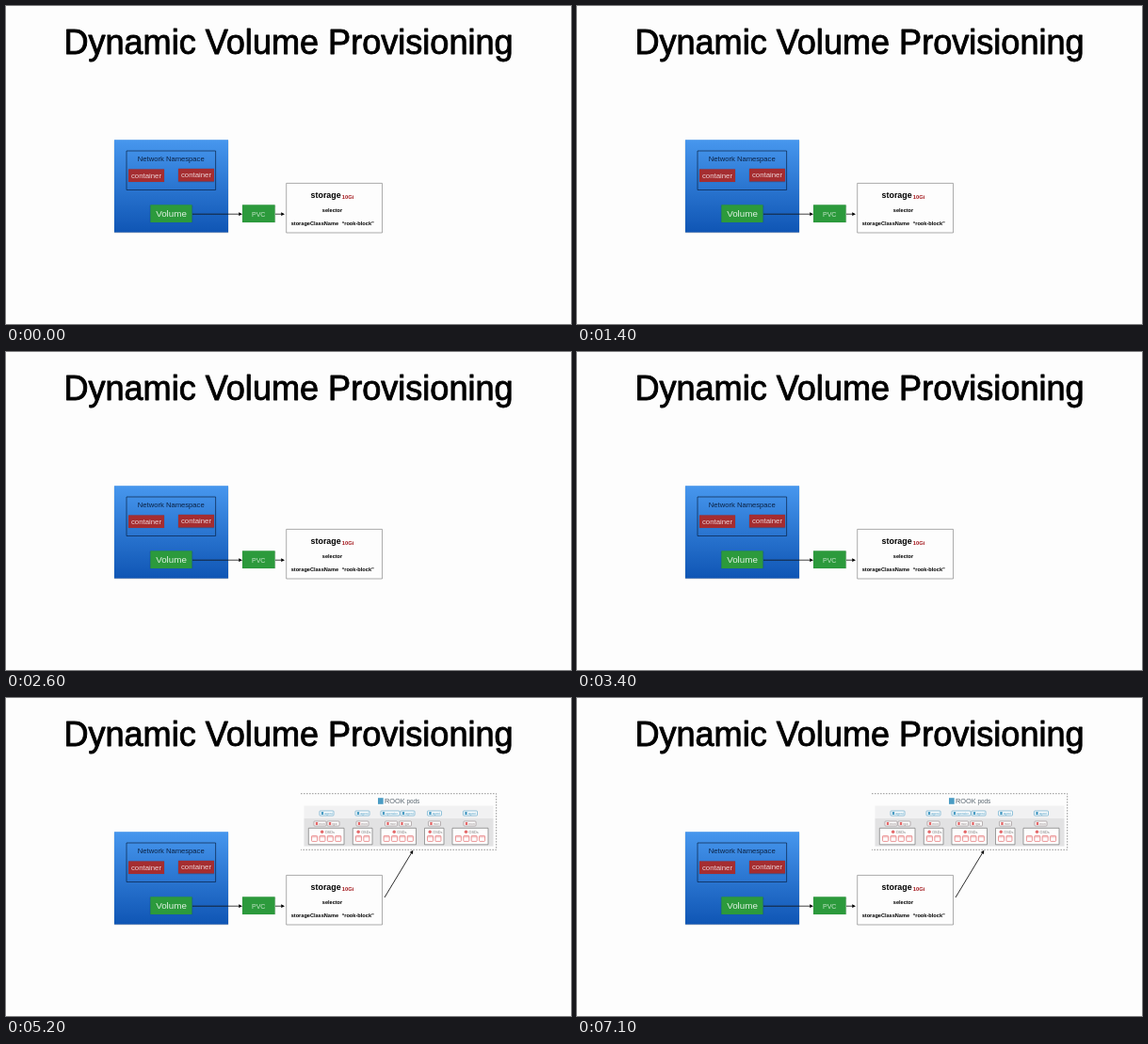
Animation of 600x338 px, one loop 7200 ms. Source, as an HTML page with a canvas:

```html
<!DOCTYPE html>
<html lang="en">
<head>
<meta charset="utf-8">
<title>Dynamic Volume Provisioning</title>
<style>
html, body { margin: 0; width: 100%; height: 100%; overflow: hidden; background: #fdfdfd; }
canvas { display: block; width: 600px; height: 338px; }
</style>
</head>
<body>
<canvas id="stage" width="600" height="338"></canvas>
<script>
const ctx = document.getElementById('stage').getContext('2d');
const LOOP = 7200, PODS_AT = 3700;
const SANS = '"Liberation Sans", Arial, sans-serif';
const PAPER = '#fdfdfd', RED = '#e4696a', BLUE = '#4a9cc4', GREEN = '#2c9a3c';

// A thin stroke of the same colour thickens the text to a medium weight.
function text(str, x, y, size, { color = '#000', weight = 400, align = 'center', stroke = 0 } = {}) {
  ctx.font = `${weight} ${size}px ${SANS}`;
  ctx.fillStyle = ctx.strokeStyle = color;
  ctx.textAlign = align;
  ctx.fillText(str, x, y);
  if (stroke) {
    ctx.lineWidth = stroke;
    ctx.lineJoin = 'round';
    ctx.strokeText(str, x, y);
  }
}

function fillBox(x, y, w, h, color) {
  ctx.fillStyle = color;
  ctx.fillRect(x, y, w, h);
}

function outline(x, y, w, h, color, width) {
  ctx.strokeStyle = color;
  ctx.lineWidth = width;
  ctx.strokeRect(x, y, w, h);
}

function line(points, color, width, dash = []) {
  ctx.strokeStyle = color;
  ctx.lineWidth = width;
  ctx.setLineDash(dash);
  ctx.beginPath();
  points.forEach(([x, y]) => ctx.lineTo(x, y));
  ctx.stroke();
  ctx.setLineDash([]);
}

function raisedBox(x, y, w, h, color) {
  ctx.save();
  ctx.shadowColor = 'rgba(0,0,0,0.3)';
  ctx.shadowBlur = 1.2;
  ctx.shadowOffsetY = 0.3;
  fillBox(x, y, w, h, color);
  ctx.restore();
}

function arrow(x1, y1, x2, y2, head = 3.8) {
  ctx.save();
  ctx.translate(x2, y2);
  ctx.rotate(Math.atan2(y2 - y1, x2 - x1));
  line([[-Math.hypot(x2 - x1, y2 - y1), 0], [-head, 0]], '#111', 0.8);
  ctx.fillStyle = '#000';
  ctx.beginPath();
  ctx.moveTo(0, 0);
  ctx.lineTo(-head, -head * 0.5);
  ctx.lineTo(-head, head * 0.5);
  ctx.fill();
  ctx.restore();
}

function drawPod() {
  const blue = ctx.createLinearGradient(0, 142, 0, 241);
  blue.addColorStop(0, '#4797ee');
  blue.addColorStop(1, '#0f55b4');
  raisedBox(115, 142.2, 121, 98.4, blue);
  outline(128, 154, 94.6, 41.5, 'rgba(8,30,65,0.85)', 0.8);
  text('Network Namespace', 175.2, 165, 7.65, { color: '#0b2142' });
  for (const [x, y] of [[130, 173.4], [183, 172.9]]) {
    raisedBox(x, y, 38, 13.6, '#a52d30');
    text('container', x + 19, y + 9.4, 7.8, { color: '#ecd3d6' });
  }
}

function drawClaim() {
  raisedBox(153.3, 211.3, 44.2, 18.7, GREEN);
  raisedBox(251, 211.3, 34.6, 18.7, GREEN);
  text('Volume', 175.5, 224.4, 9.8, { color: '#e2f2e4' });
  text('PVC', 268.2, 223.5, 7.1, { color: '#c4e4c9' });
  arrow(198, 221.2, 251, 221.2);
  arrow(286, 221.2, 296, 221.2);
}

function drawStorageClass() {
  const bold = { weight: 700 };
  outline(297.7, 188.4, 101.8, 52.6, '#888', 0.7);
  text('storage', 339.6, 204.1, 8.9, bold);
  text('10Gi', 363.1, 204.6, 5.8, { weight: 700, color: '#a3171c' });
  text('selector', 346.5, 219, 5.55, bold);
  text('storageClassName', 302.7, 232.9, 5.6, { weight: 700, align: 'left' });
  text('\u201crook-block\u201d', 356.4, 232.9, 5.65, { weight: 700, align: 'left' });
}

function pill(x, y, w, label, color, edge) {
  ctx.fillStyle = PAPER;
  ctx.strokeStyle = edge;
  ctx.lineWidth = 0.6;
  ctx.beginPath();
  ctx.roundRect(x, y, w, 5, 0.8);
  ctx.fill();
  ctx.stroke();
  fillBox(x + 1.8, y + 1, 2.4, 3, color);
  text(label, x + 5.2, y + 3.7, 3.4, { color: edge, align: 'left' });
}

function disk(x, y) {
  ctx.fillStyle = PAPER;
  ctx.strokeStyle = RED;
  ctx.lineWidth = 0.7;
  ctx.beginPath();
  ctx.roundRect(x, y, 6, 6, 0.8);
  ctx.fill();
  ctx.stroke();
  line([[x, y + 1.4], [x + 6, y + 1.4]], RED, 0.5);
}

function node(x, w, disks) {
  const mid = x + w / 2;
  fillBox(x, 138.3, w, 17.5, PAPER);
  outline(x, 138.3, w, 17.5, '#777', 0.7);
  ctx.fillStyle = RED;
  ctx.beginPath();
  ctx.arc(mid - 4.5, 142.2, 1.7, 0, Math.PI * 2);
  ctx.fill();
  text('OSDs', mid - 1.5, 143.5, 3.8, { color: '#777', align: 'left' });
  for (let i = 0; i < disks; i++) disk(mid + (i - (disks - 1) / 2) * 8.4 - 3, 146.4);
}

function drawStorageCluster() {
  fillBox(316.5, 114.5, 201, 13.7, '#f1f1f2');
  fillBox(316.5, 128, 201, 29.5, '#e2e2e3');
  line([[313, 101.7], [520.7, 101.7], [520.7, 161.3], [313, 161.3]], '#777', 0.75, [1.6, 1.4]);

  fillBox(395, 106.2, 5.7, 6.6, BLUE);
  text('ROOK', 402, 112.2, 7.4, { color: '#5a6670', align: 'left' });
  text('pods', 425.4, 112.2, 6.4, { color: '#5a6670', align: 'left' });

  for (const x of [333, 371, 419, 447.5, 485.5]) pill(x, 120, 15, 'agent', BLUE, BLUE);
  pill(398, 120, 20, 'operator', BLUE, BLUE);
  for (const x of [327, 372, 402.5, 448.5, 486]) pill(x, 131, 13, 'mon', RED, '#8d8283');
  for (const x of [341, 417.5]) pill(x, 131, 13, 'rgw', RED, '#8d8283');

  node(321.3, 37.7, 4);
  node(368.3, 20.7, 2);
  node(398, 37.5, 4);
  node(444.5, 20.5, 2);
  node(474, 38, 4);
  arrow(402, 212, 432.3, 161.8);
}

function render(time) {
  fillBox(0, 0, 600, 338, PAPER);
  text('Dynamic Volume Provisioning', 300, 50.8, 36.1, { stroke: 0.9 });
  drawPod();
  drawClaim();
  drawStorageClass();
  if (time >= PODS_AT) drawStorageCluster();
}

const start = performance.now();
function tick() {
  render((performance.now() - start) % LOOP);
  requestAnimationFrame(tick);
}
tick();
</script>
</body>
</html>
```
